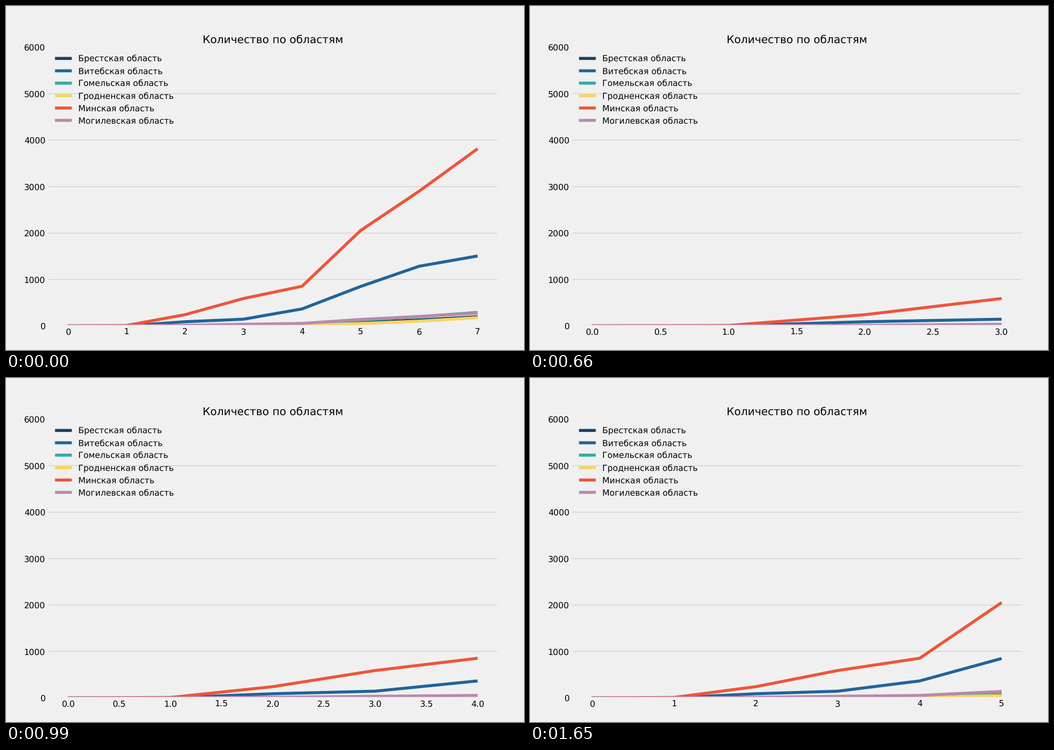
Animation, 917 px wide and 611 px high, one loop 1980 ms. Source, as a matplotlib script:

```python
import matplotlib.pyplot as plt
import numpy as np
from matplotlib.animation import FuncAnimation

W, H, DPI = 917, 611, 76.4
BG = "#f0f0f0"

plt.rcParams.update({
    "font.family": "DejaVu Sans",
    "font.size": 14,
    "text.hinting": "none",
    "path.snap": False,
    "axes.facecolor": BG,
    "axes.edgecolor": BG,
    "axes.linewidth": 3,
    "axes.axisbelow": True,
    "grid.color": "#cbcbcb",
    "grid.linewidth": 1,
    "lines.linewidth": 5,
    "lines.solid_capstyle": "butt",
    "xtick.major.size": 0,
    "ytick.major.size": 0,
})

# The two leading curves; the small regions follow the first one's growth.
LEAD = np.array([0, 10, 242, 590, 854, 2053, 2900, 3815, 5298])
SECOND = np.array([0, 2, 90, 145, 366, 849, 1285, 1506, 1938])


def follow(total, power):
    """Share of the lead's growth; a higher power starts later."""
    return total * (LEAD / LEAD[-1]) ** power


SERIES = [
    ("Брестская", "#173f5f", follow(332, 1.6)),
    ("Витебская", "#20639b", SECOND),
    ("Гомельская", "#2faba4", follow(460, 1.4)),
    ("Гродненская", "#f6d55c", follow(344, 2)),
    ("Минская", "#ed553b", LEAD),
    ("Могилевская", "#b989ad", follow(395, 1.1)),
]
LAST_DAY = [7, 8, 3, 4, 6, 5]

fig = plt.figure(figsize=((W + 0.01) / DPI, (H + 0.01) / DPI), dpi=DPI, facecolor=BG)
fig.subplots_adjust(left=0.08, right=0.95, bottom=0.07, top=0.88)
ax = fig.add_subplot()
ax.set_title("Количество по областям", fontsize=18)
ax.set_ylim(0, 6000)
ax.grid(axis="y")

lines = [ax.plot([], [], color=color, label=f"{name} область")[0]
         for name, color, _ in SERIES]
ax.legend(loc="upper left", frameon=False)


def update(i):
    day = LAST_DAY[i % len(LAST_DAY)]
    for line, (_, _, counts) in zip(lines, SERIES):
        line.set_data(range(day + 1), counts[:day + 1])
    ax.set_xlim(-0.05 * day, 1.05 * day)
    return lines


anim = FuncAnimation(fig, update, frames=len(LAST_DAY), interval=330,
                     repeat=True, repeat_delay=0, blit=False)
plt.show()
```
